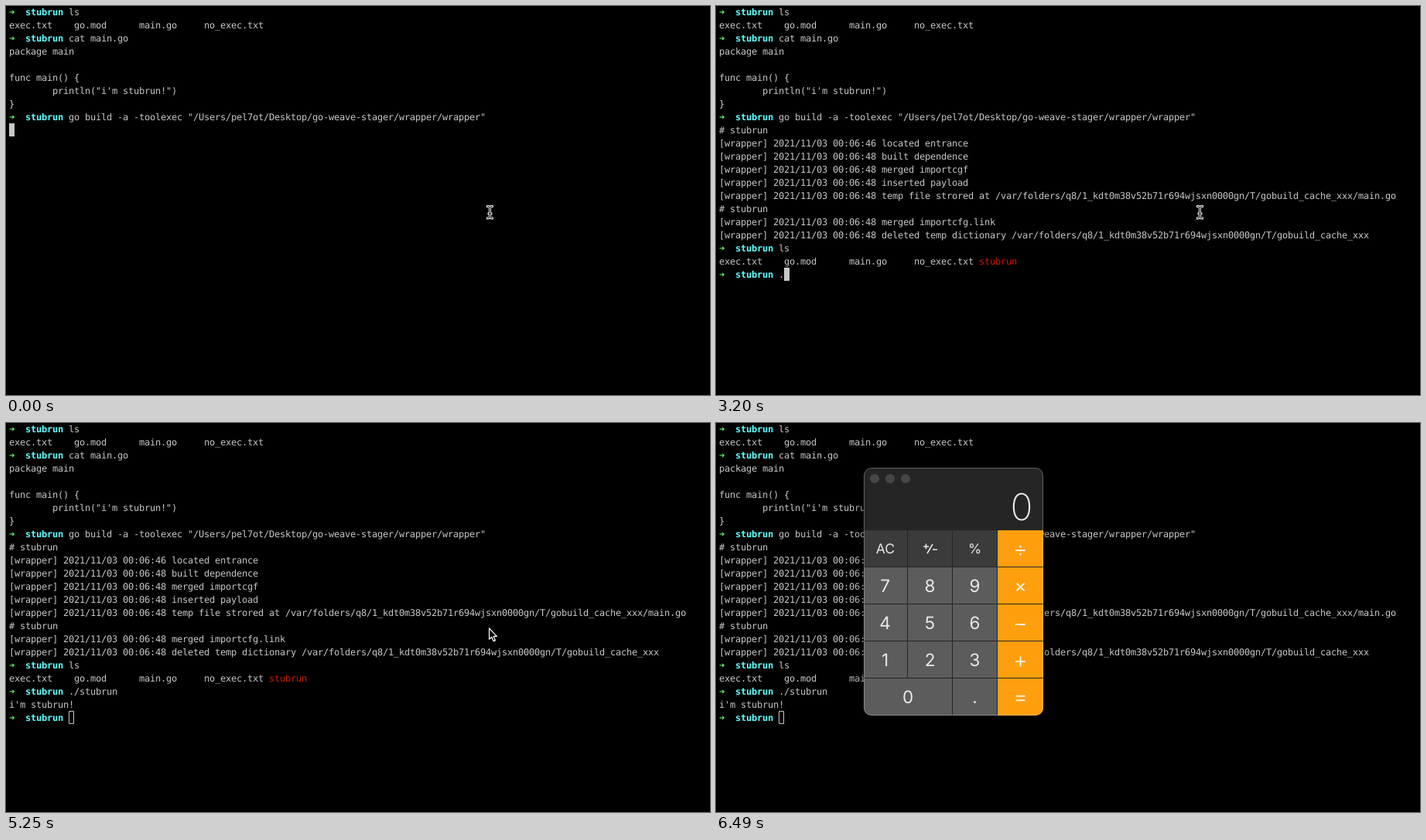
An HTML page with a canvas for the animation above (6.59 s loop, 910 px wide and 504 px high).

```html
<!DOCTYPE html>
<html lang="en">
<head>
<meta charset="utf-8">
<title>Terminal session</title>
<style>
html, body { margin: 0; width: 100%; height: 100%; overflow: hidden; background: #000; }
canvas { display: block; }
</style>
</head>
<body>
<canvas id="stage" width="910" height="504"></canvas>
<script>
const ctx = document.getElementById('stage').getContext('2d');
// Unhinted glyphs, as on a high-density display
ctx.textRendering = 'geometricPrecision';
ctx.lineJoin = 'round';

const LOOP = 6590;
const CELL = 7, LINE = 17, LEFT = 4;
const MONO = '"DejaVu Sans Mono", "Liberation Mono", monospace';
const SANS = 'Inter, Roboto, "Open Sans", sans-serif';
const GREY = '#c7c7c7', GREEN = '#5ffa68', CYAN = '#60fdff', RED = '#c91b00';

const APP = 'stubrun';
const CACHE = '/var/folders/q8/1_kdt0m38v52b71r694wjsxn0000gn/T/gobuild_cache_xxx';
const FILES = 'exec.txt    go.mod      main.go     no_exec.txt';
const log = (sec, msg) => `[wrapper] 2021/11/03 00:06:${sec} ${msg}`;

const SOURCE = ['package main', '', 'func main() {', `        println("i'm ${APP}!")`, '}'];
const BUILD = [
  `# ${APP}`,
  log(46, 'located entrance'),
  log(48, 'built dependence'),
  log(48, 'merged importcgf'),
  log(48, 'inserted payload'),
  log(48, `temp file strored at ${CACHE}/main.go`),
  `# ${APP}`,
  log(48, 'merged importcfg.link'),
  log(48, `deleted temp dictionary ${CACHE}`)
];

// Text typed so far, from [time, text] pairs
const typed = (t, steps) => steps.reduce((text, [at, next]) => t >= at ? next : text, '');

const rowTop = row => row * LINE - 1;

function put(text, col, row, color = GREY, weight = 'normal') {
  ctx.font = `${weight} 12px ${MONO}`;
  ctx.fillStyle = color;
  ctx.textAlign = 'left';
  [...text].forEach((ch, i) => {
    if (ch !== ' ') ctx.fillText(ch, LEFT + (col + i) * CELL, rowTop(row) + 13);
  });
}

function prompt(row, command) {
  put('➜', 0, row, GREEN, 'bold');
  put(APP, 3, row, CYAN, 'bold');
  put(command, 11, row);
}

function block(col, row, hollow) {
  const x = LEFT + col * CELL, y = rowTop(row);
  if (hollow) {
    ctx.strokeStyle = GREY;
    ctx.lineWidth = 1;
    ctx.strokeRect(x + 0.5, y + 0.5, CELL - 1, LINE - 1);
  } else {
    ctx.fillStyle = GREY;
    ctx.fillRect(x, y, CELL, LINE);
  }
}

function terminal(t) {
  const lines = (list, row) => list.forEach((text, i) => put(text, 0, row + i));
  prompt(0, 'ls');
  put(FILES, 0, 1);
  prompt(2, 'cat main.go');
  lines(SOURCE, 3);
  prompt(8, 'go build -a -toolexec "/Users/pel7ot/Desktop/go-weave-stager/wrapper/wrapper"');
  if (t < 1870) return block(0, 9);

  lines(BUILD, 9);
  const list = typed(t, [[2230, 'l'], [2320, 'ls']]);
  prompt(18, list);
  if (t < 2400) return block(11 + list.length, 18);
  if (t < 2490) return block(0, 19);

  put(FILES, 0, 19);
  put(APP, 48, 19, RED);
  const run = typed(t, [
    [3200, '.'], [3380, './'], [3730, './' + APP.slice(0, 2)], [3910, `./${APP} `]
  ]);
  prompt(20, run);
  if (t < 4180) return block(11 + run.length, 20);
  if (t < 5170) return block(0, 21);

  put(`i'm ${APP}!`, 0, 21);
  prompt(22, '');
  block(11, 22, t >= 5250);
}

function segments(color, width, list) {
  ctx.strokeStyle = color;
  ctx.lineWidth = width;
  ctx.beginPath();
  for (const [x1, y1, x2, y2] of list) {
    ctx.moveTo(x1, y1);
    ctx.lineTo(x2, y2);
  }
  ctx.stroke();
}

function disc(x, y, r, color) {
  ctx.fillStyle = color;
  ctx.beginPath();
  ctx.arc(x, y, r, 0, Math.PI * 2);
  ctx.fill();
}

function label(text, x, baseline, size, weight = 400) {
  ctx.font = `${weight} ${size}px ${SANS}`;
  ctx.fillStyle = '#e9e9e9';
  ctx.textAlign = 'center';
  ctx.fillText(text, x, baseline);
}

function operator(sign, x, y) {
  const shapes = {
    '÷': [[-6.5, 0, 6.5, 0]],
    '×': [[-5, -5, 5, 5], [-5, 5, 5, -5]],
    '-': [[-6.5, 0, 6.5, 0]],
    '+': [[-6.5, 0, 6.5, 0], [0, -6.5, 0, 6.5]],
    '=': [[-6, -2.7, 6, -2.7], [-6, 2.7, 6, 2.7]]
  };
  const color = '#fbeedb';
  ctx.save();
  ctx.translate(x, y);
  segments(color, 2, shapes[sign]);
  if (sign === '÷') [-5, 5].forEach(dy => disc(0, dy, 1.5, color));
  ctx.restore();
}

function calculator(active) {
  const x = 191, y = 58, w = 232, h = 321;
  const frame = inset => {
    ctx.beginPath();
    ctx.roundRect(x + inset, y + inset, w - 2 * inset, h - 2 * inset, 10 - inset);
  };
  ctx.save();
  ctx.shadowColor = active ? 'rgba(0,0,0,.6)' : 'rgba(0,0,0,.45)';
  ctx.shadowBlur = active ? 44 : 22;
  ctx.shadowOffsetY = active ? 16 : 8;
  ctx.fillStyle = '#252525';
  frame(0);
  ctx.fill();
  ctx.restore();

  ctx.save();
  frame(0);
  ctx.clip();
  const cols = [[191, 56], [248, 57], [306, 57], [364, 59]];
  for (let r = 0; r < 5; r++) {
    const top = 139 + 48 * r, height = r === 4 ? 48 : 47;
    cols.forEach(([left, width], c) => {
      ctx.fillStyle = c === 3 ? '#ff9f0e' : r === 0 ? '#3b3b3b' : '#5c5c5c';
      const wide = r === 4 && c === 0;
      if (r === 4 && c === 1) return;
      ctx.fillRect(left, top, wide ? 114 : width, height);
    });
  }
  ctx.restore();

  ctx.strokeStyle = 'rgba(255,255,255,.27)';
  ctx.lineWidth = 1;
  frame(0.5);
  ctx.stroke();

  ['#ff5f57', '#febc2e', '#28c840'].forEach((color, i) =>
    disc(205 + 20 * i, 72, 6, active ? color : '#464646'));
  label('0', 395, 126, 48, 200);

  label('AC', 219, 169, 17.5);
  segments('#e9e9e9', 1.5, [
    [268, 160, 275, 160], [271.5, 156.5, 271.5, 163.5],
    [273, 169, 280, 157], [280, 164, 286, 164]
  ]);
  label('%', 334.5, 169, 17.5);
  for (let n = 1; n <= 9; n++) {
    label(String(n), 218.5 + 58 * ((n - 1) % 3), 315 - 48 * Math.floor((n - 1) / 3), 22.5);
  }
  label('0', 248, 363, 22.5);
  label('.', 334.5, 363, 22.5);
  [...'÷×-+='].forEach((sign, i) => operator(sign, 393.5, [165, 212.5, 261, 309, 356.5][i]));
}

function textPointer(x, y) {
  ctx.save();
  ctx.translate(x, y);
  ctx.lineCap = 'square';
  const shape = new Path2D(
    'M-3-7.5Q0-7.5 0-5.5Q0-7.5 3-7.5M0-5.5V6M-3 8Q0 8 0 6Q0 8 3 8M-1.5 2H1.5');
  for (const [color, width] of [['#fff', 2.8], ['#000', 1]]) {
    ctx.strokeStyle = color;
    ctx.lineWidth = width;
    ctx.stroke(shape);
  }
  ctx.restore();
}

function arrowPointer(x, y) {
  ctx.save();
  ctx.translate(x, y);
  const shape = new Path2D('M.6.8V15.2L3.8 12.2L6.2 17.6L8.5 16.6L6.2 11.4H10.4Z');
  ctx.fillStyle = '#000';
  ctx.fill(shape);
  ctx.strokeStyle = '#fff';
  ctx.lineWidth = 1.2;
  ctx.stroke(shape);
  ctx.restore();
}

function pointer(t) {
  if (t < 5250) return textPointer(625.5, 267);
  if (t >= 6040) return;
  // Sampled in 86 ms steps on its way out through the bottom edge
  const k = t < 5610 ? 0 : Math.floor((t - 5610) / 86) + 1;
  const p = k / 5, ease = p * p * (3 - 2 * p);
  arrowPointer(624 + 217 * ease, 265 + 230 * ease);
}

function draw(t) {
  ctx.fillStyle = '#000';
  ctx.fillRect(0, 0, 910, 504);
  terminal(t);
  if (t >= 5340) calculator(t < 6490);
  pointer(t);
}

const start = performance.now();
function tick() {
  draw((performance.now() - start) % LOOP);
  requestAnimationFrame(tick);
}
tick();
</script>
</body>
</html>
```
